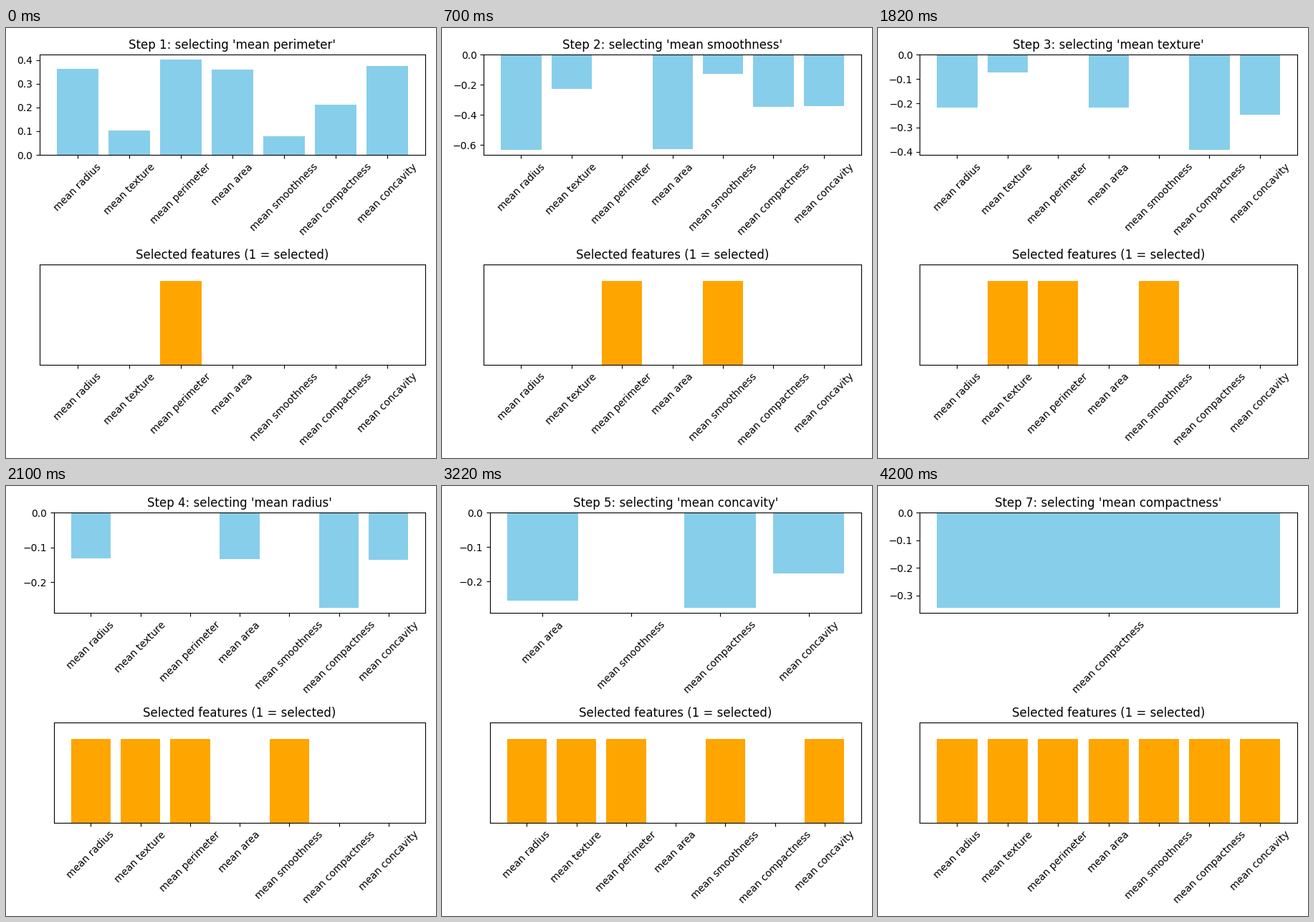
Write a matplotlib script that moves like this. It is 600x600 px and loops after 4.9 s.

```python
import matplotlib.pyplot as plt
import numpy as np
from matplotlib.animation import FuncAnimation

NAMES = ["mean " + word for word in (
    "radius", "texture", "perimeter", "area",
    "smoothness", "compactness", "concavity")]

# How much each feature tells about the label, and what it shares with others.
RELEVANCE = np.array([0.364, 0.104, 0.4024, 0.3602, 0.079, 0.213, 0.3738])
SIZE = [0.998, 0.33, 1, 0.986, 0.207, 0.557, 0.716]
SHAPE = [-0.065, 0.08, 0, -0.05, 0.65, 0.83, 0.583]
GRAIN = [0, -0.38, 0, 0, 0.38, 0, 0]


def rank_features():
    """Greedy choice: relevance minus mean redundancy with earlier picks."""
    factors = np.array([SIZE, SHAPE, GRAIN])
    redundancy = np.abs(factors.T @ factors)
    picks, steps = [], []
    for _ in NAMES:
        scores = RELEVANCE.copy()
        if picks:
            scores -= redundancy[picks].mean(axis=0)
        scores[picks] = np.nan
        steps.append(scores)
        picks.append(int(np.nanargmax(scores)))
    return picks, steps


def draw_bars(ax, heights, color, title):
    ax.bar(NAMES, heights, color=color)
    ax.set_title(title)
    ax.tick_params(axis="x", rotation=45)


def update(step):
    # Start from the default margins so the layout depends on this step only.
    fig.clf()
    fig.subplots_adjust(left=0.125, right=0.9, bottom=0.11, top=0.88, hspace=0.2)
    top, bottom = fig.subplots(2, 1)

    # Bars without a score drop out of the x range.
    draw_bars(top, STEPS[step], "skyblue",
              f"Step {step + 1}: selecting '{NAMES[PICKS[step]]}'")
    chosen = np.isin(range(len(NAMES)), PICKS[:step + 1])
    draw_bars(bottom, chosen.astype(int), "orange",
              "Selected features (1 = selected)")
    bottom.set_ylim(0, 1.2)
    bottom.set_yticks([])
    fig.tight_layout()
    return []


PICKS, STEPS = rank_features()
fig = plt.figure(figsize=(6, 6), dpi=100)
anim = FuncAnimation(fig, update, frames=len(NAMES), interval=700,
                     repeat=True, repeat_delay=0)
plt.show()
```
